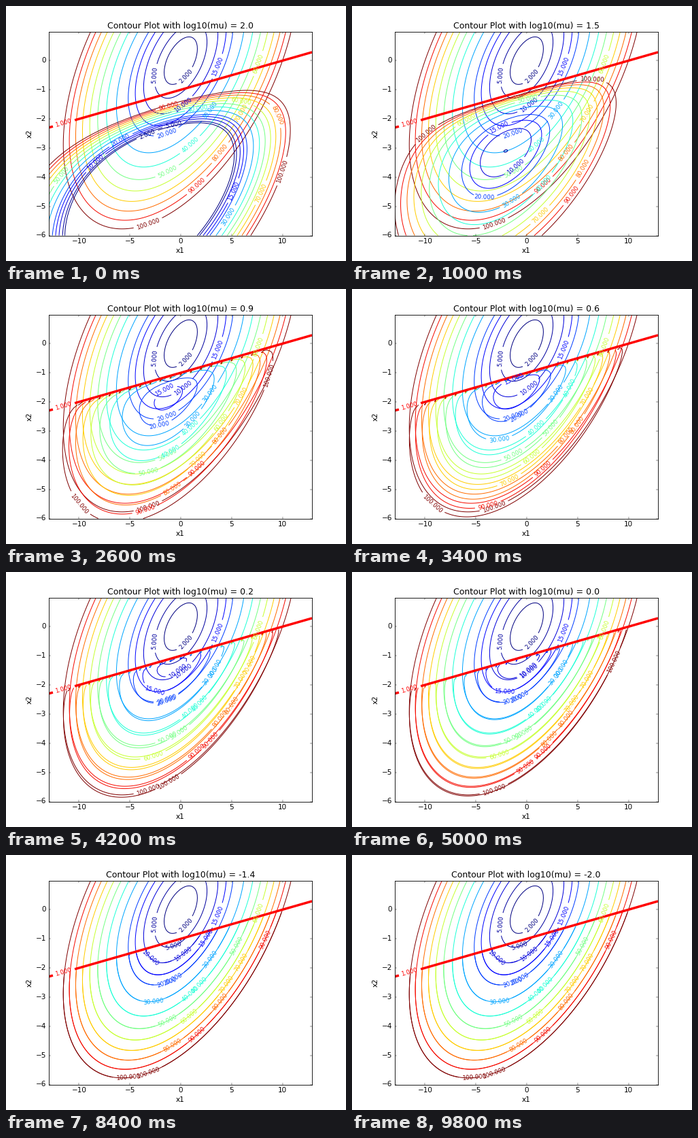
These frames come from a looping animation (500x375 px, 10000 ms). A matplotlib script:

```python
import numpy as np
import matplotlib.pyplot as plt
from matplotlib.animation import FuncAnimation
from matplotlib.contour import QuadContourSet

FRAMES = 50
DPI = 62.5
SCALE = DPI / 80
CHAR_WIDTH = 6.7
LEVELS = [2, 5, 10, 15, 20, 30, 40, 50, 60, 70, 80, 90, 100]

plt.style.use("classic")
plt.rcParams.update({
    "font.family": "DejaVu Sans",
    "figure.facecolor": "white",
    "savefig.facecolor": "white",
    "savefig.dpi": "figure",
})


class SpacedContours(QuadContourSet):
    """Contours whose labels are spaced by character count."""

    def _get_nth_label_width(self, nth):
        text = self.get_text(self.labelLevelList[nth], self.labelFmt)
        return CHAR_WIDTH * len(text) * SCALE

    def locate_label(self, line, width):
        return super().locate_label(line, width / SCALE)

    def too_close(self, x, y, width):
        return super().too_close(x, y, width * SCALE)


x1, x2 = np.meshgrid(np.arange(-13.0, 13.0, 0.1), np.arange(-6.0, 1.1, 0.1))
objective = x1**2 - 2 * x1 * x2 + 4 * x2**2
slack = 0.1 * x1 - x2 - 1
log_slack = np.ma.log(np.ma.masked_less_equal(slack, 0))

fig = plt.figure(figsize=(8, 6), dpi=DPI)
ax = fig.add_axes([0.125, 0.1, 0.775, 0.8])


def draw_contours(z):
    cs = SpacedContours(ax, x1, x2, z, levels=LEVELS, cmap="jet",
                        linewidths=1.15, algorithm="mpl2014",
                        corner_mask=True)
    cs.clabel(inline=True, fontsize=10, fmt="%1.3f", inline_spacing=5 * SCALE)


def draw_constraint():
    for a, b in ((-13, -12.57), (-10.42, 12.9)):
        ax.plot([a, b], [0.1 * a - 1, 0.1 * b - 1], color="red", lw=4,
                solid_capstyle="butt", zorder=2.5)
    ax.text(-11.53, -2.153, "1.000", color="red", fontsize=10, rotation=16,
            ha="center", va="center", zorder=4)


def update(i):
    power = 2 - 4 * i / (FRAMES - 1)
    ax.cla()
    ax.set_xlim(-13, 12.9)
    ax.set_ylim(-6, 1)
    ax.set_xticks(range(-10, 11, 5))
    ax.set_yticks(range(-6, 1))
    ax.set_xlabel("x1")
    ax.set_ylabel("x2")
    ax.set_title(f"Contour Plot with log10(mu) = {int(power * 10) / 10}")
    draw_contours(objective)
    draw_constraint()
    draw_contours(objective - 10**power * log_slack)
    return []


anim = FuncAnimation(fig, update, frames=FRAMES, interval=200, repeat=True,
                     repeat_delay=0, blit=False)
plt.show()
```
